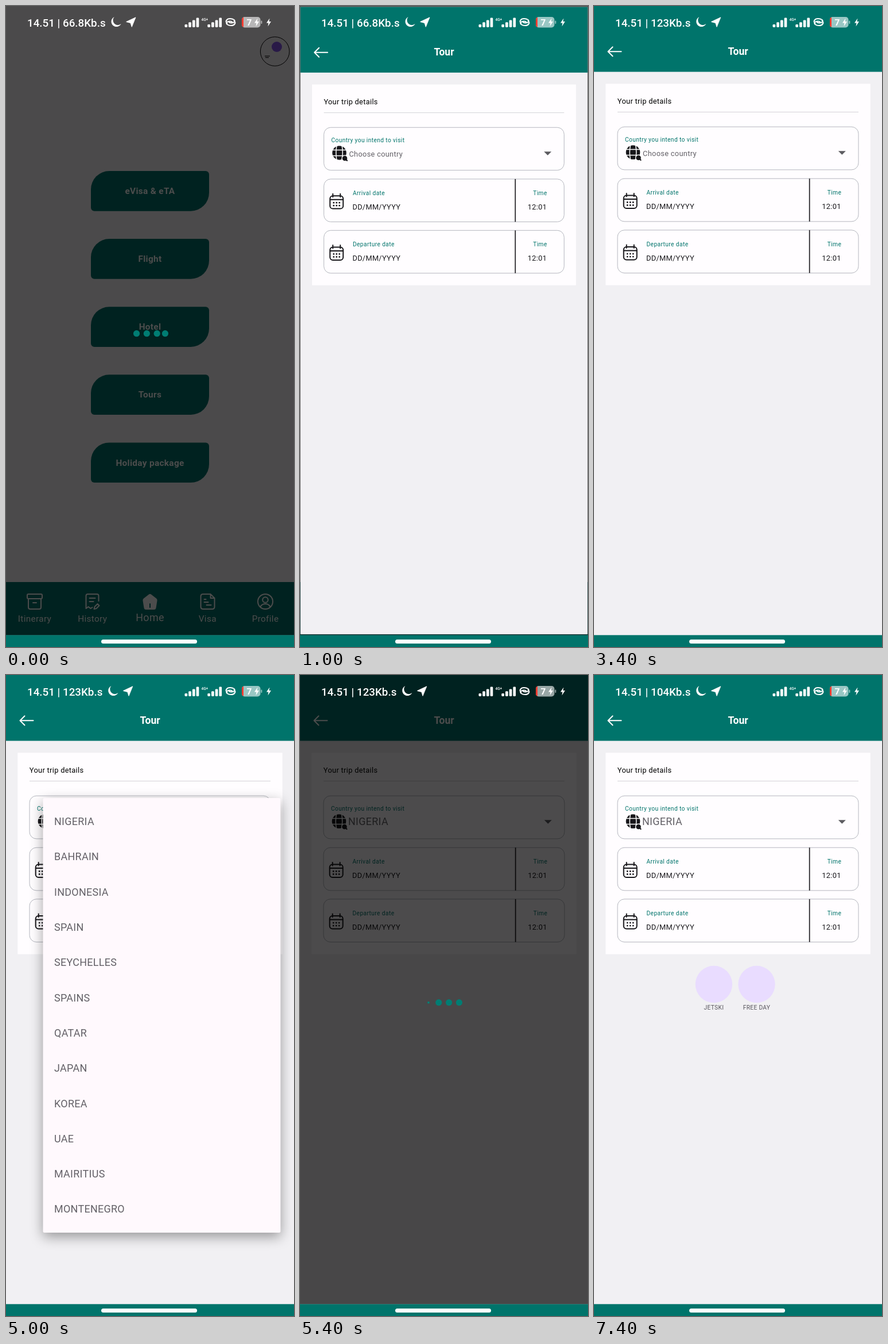
Write an HTML page with a canvas that moves like this. It is 502 px wide and 1115 px high and loops after 8 s.

```html
<!DOCTYPE html>
<html lang="en">
<head>
<meta charset="utf-8">
<title>Tour booking</title>
<style>
html, body { margin: 0; width: 100%; height: 100%; overflow: hidden; background: #00746b; }
canvas { display: block; width: 502px; height: 1115px; }
</style>
</head>
<body>
<canvas></canvas>
<script>
const W = 502, H = 1115, PAGE_H = 1094.5;
const LOOP = 8000, STEP = 200;
const GREEN = '#00746b', INK = '#17161a', GRAY = '#626066', WHITE = '#fff';
const COUNTRIES = ['NIGERIA', 'BAHRAIN', 'INDONESIA', 'SPAIN', 'SEYCHELLES', 'SPAINS',
  'QATAR', 'JAPAN', 'KOREA', 'UAE', 'MAIRITIUS', 'MONTENEGRO'];

const canvas = document.querySelector('canvas');
const ctx = canvas.getContext('2d');
const ratio = window.devicePixelRatio || 1;
canvas.width = W * ratio;
canvas.height = H * ratio;

const clamp = v => Math.min(1, Math.max(0, v));

// y is the middle of the capital letters
function text(str, x, y, size, color, { weight = 400, align = 'left', gap = 0.32 } = {}) {
  ctx.font = `${weight} ${size}px Roboto, sans-serif`;
  ctx.letterSpacing = gap + 'px';
  ctx.textAlign = align;
  ctx.fillStyle = color;
  ctx.fillText(str, x, y + size * 0.3555);
  return ctx.measureText(str).width;
}

function rect(x, y, w, h, color) {
  ctx.fillStyle = color;
  ctx.fillRect(x, y, w, h);
}

function round(x, y, w, h, r, fill, stroke, line = 1) {
  ctx.beginPath();
  ctx.roundRect(x, y, w, h, r);
  paint(fill, stroke, line);
}

function circle(x, y, r, fill, stroke, line = 1) {
  ctx.beginPath();
  ctx.arc(x, y, r, 0, Math.PI * 2);
  paint(fill, stroke, line);
}

function paint(fill, stroke, line) {
  if (fill) { ctx.fillStyle = fill; ctx.fill(); }
  if (stroke) { ctx.strokeStyle = stroke; ctx.lineWidth = line; ctx.stroke(); }
}

// SVG path placed around its own centre
function icon(x, y, d, fill, stroke, line = 2) {
  const path = new Path2D(d);
  ctx.save();
  ctx.translate(x, y);
  ctx.lineCap = ctx.lineJoin = 'round';
  if (fill) { ctx.fillStyle = fill; ctx.fill(path); }
  if (stroke) { ctx.strokeStyle = stroke; ctx.lineWidth = line; ctx.stroke(path); }
  ctx.restore();
}

const BOLT = 'M1.5-7L-4 1H-.5L-1.5 7L4-1.5H.5Z';

function statusBar(speed) {
  const end = 37 + text(`14.51 | ${speed}Kb.s`, 37, 29, 18.8, WHITE, { weight: 500, gap: 0 });
  icon(end + 18, 28, 'M-3-9A9 9 0 1 0 9 3A8.5 8.5 0 0 1-3-9Z', WHITE);
  icon(end + 44, 28, 'M8-8L-8-.5L-.5 1.5L1.5 8Z', WHITE, WHITE, 1);
  for (const left of [311.5, 351.3]) {
    for (let i = 0; i < 4; i++) {
      const h = 5 + i * 3.8;
      round(left + i * 6.7, 37 - h, 4.7, h, 1.4, WHITE);
    }
  }
  text('4G+', 340.5, 24, 6.5, WHITE, { weight: 500, gap: 0 });
  icon(391.5, 28, 'M-6 2C-10-1-7-6-1-6C5-6 8-3 7-1C6 2-1 2-3 0M6-2C10 1 7 6 1 6C-5 6-8 3-7 1C-6-2 1-2 3 0', null, WHITE, 2);
  ctx.save();
  ctx.beginPath();
  ctx.roundRect(411, 19, 32.5, 18.5, 5);
  ctx.clip();
  rect(411, 19, 33, 19, 'rgba(255,255,255,.6)');
  rect(411, 19, 3, 19, '#ff3b30');
  ctx.restore();
  round(444.5, 25.5, 1.8, 5.5, 1, 'rgba(255,255,255,.6)');
  text('7', 424, 28.5, 15.5, WHITE, { weight: 700, align: 'center', gap: 0 });
  icon(437, 28.5, BOLT, WHITE);
  icon(458, 28.5, BOLT, WHITE);
}

function systemStrip() {
  rect(0, PAGE_H, W, H - PAGE_H, GREEN);
  round(166, 1102, 167, 7, 3.5, WHITE);
}

function navBar() {
  rect(0, 1002, W, PAGE_H - 1002, GREEN);
  const label = (str, x) => text(str, x, 1065.5, 15.36, WHITE, { align: 'center' });
  const y = 1036;
  icon(50, y, 'M-11-13H11Q13-13 13-11V-7Q13-5 11-5H-11Q-13-5-13-7V-11Q-13-13-11-13ZM-11-5V10Q-11 13-8 13H8Q11 13 11 10V-5M-3 2H3', null, WHITE);
  icon(150.5, y, 'M11-1V-10Q11-13 8-13H-8Q-11-13-11-10V12L-7 9L-3 12L0 10M-5-6H5M-5 0H2M3 13L4 9L9 4L12 7L7 12Z', null, WHITE);
  icon(251, y, 'M-2-12.5Q0-14 2-12.5L11-5.5Q13-4 12.5-1.5L10.5 11Q10 14 7 14H-7Q-10 14-10.5 11L-12.5-1.5Q-13-4-11-5.5Z', WHITE);
  icon(251, y + 6, 'M0-2V4', null, GREEN);
  icon(351.5, y, 'M-8-13H5L12-6V9Q12 13 8 13H-8Q-12 13-12 9V-9Q-12-13-8-13ZM-6-4H-3M-6 1H1M-2 6H6M5-12V-6H11', null, WHITE);
  circle(452, y, 13, null, WHITE, 2);
  circle(452, y - 3, 4.8, null, WHITE, 2);
  icon(452, y, 'M-8.5 9Q-6 4 0 4T8.5 9', null, WHITE);
  label('Itinerary', 50);
  label('History', 150.7);
  label('Visa', 351.3);
  label('Profile', 452);
  text('Home', 251, 1063.5, 17.9, WHITE, { align: 'center' });
}

function homePage() {
  rect(0, 0, W, PAGE_H, '#fdf8fd');
  circle(468.7, 79, 25.3, null, '#000');
  circle(472, 71, 9, '#8a58f0');
  rect(451, 86.5, 9, 1.2, '#222');
  rect(452, 89, 6, 1.2, '#222');
  ['eVisa & eTA', 'Flight', 'Hotel', 'Tours', 'Holiday package'].forEach((name, i) => {
    const y = 287 + i * 118.1;
    round(148, y, 206, 69.7, [32, 6, 32, 6], GREEN);
    text(name, 251, y + 34.7, 15.36, WHITE, { weight: 700, align: 'center' });
  });
  navBar();
}

function globe(x, y) {
  circle(x, y, 12.3, INK);
  icon(x, y, 'M-13-5H13M-13 5H13M0-13V-13M-4.5-13Q-7 0-4.5 13M4.5-13Q7 0 4.5 13', null, WHITE, 1.5);
  circle(x + 9.5, y + 9.5, 5.6, WHITE);
  circle(x + 9.5, y + 9.5, 4.3, INK);
  icon(x + 12, y + 12, 'M0 0L1.5 1.5', null, INK, 2.2);
}

function calendar(x, y) {
  round(x - 11.5, y - 9.5, 23, 22.5, 5, null, INK, 2);
  icon(x, y, 'M-6.5-13V-7.5M6.5-13V-7.5M-11-3H11', null, INK, 2);
  for (let i = 0; i < 6; i++) {
    circle(x + (i % 3 - 1) * 5, y + 2.5 + Math.floor(i / 3) * 5, 1.4, INK);
  }
}

function fieldBox(y) {
  round(41, y, 420, 74.7, 12, null, '#b4b6be');
}

function label(str, x, y, align) {
  text(str, x, y, 10.24, GREEN, { gap: 0.38, align });
}

function dateField(y, name) {
  fieldBox(y);
  rect(374.8, y, 1.7, 74.7, '#1d1c20');
  calendar(63.2, y + 38.8);
  label(name, 91.5, y + 24.3);
  text('DD/MM/YYYY', 91, y + 48.5, 12.8, INK);
  label('Time', 419, y + 24.3, 'center');
  text('12:01', 414, y + 48.5, 12.8, INK, { align: 'center' });
}

function tourPage({ country, activities }) {
  rect(0, 0, W, PAGE_H, '#f1f0f3');
  rect(0, 0, W, 114.5, GREEN);
  icon(36, 79.3, 'M11.5 0H-11M-3.5-8L-11.5 0L-3.5 8', null, WHITE, 2);
  text('Tour', 251, 78.5, 17.5, WHITE, { weight: 700, align: 'center', gap: 0 });

  rect(20.3, 135.3, 461.5, 350.3, '#fffdff');
  text('Your trip details', 40.8, 165, 12.8, '#000');
  rect(41, 184, 420, 1, '#d4d3d8');

  fieldBox(210.2);
  label('Country you intend to visit', 54, 232.3);
  globe(68, 254.5);
  if (country) text(country, 84, 255, 17.9, GRAY);
  else text('Choose country', 85, 256.7, 12.8, GRAY);
  icon(432.3, 255.5, 'M-6.5-3.2H6.5L0 3.3Z', '#5c5b60');
  dateField(300.2, 'Arrival date');
  dateField(389.8, 'Departure date');

  if (activities) {
    ['JETSKI', 'FREE DAY'].forEach((name, i) => {
      const x = 208.9 + i * 74.6;
      circle(x, 538, 32.2, '#e9dcff');
      text(name, x, 578, 10.24, '#57545c', { align: 'center' });
    });
  }
}

function countryMenu() {
  ctx.save();
  ctx.shadowColor = 'rgba(0,0,0,.38)';
  ctx.shadowBlur = 22 * ratio;
  ctx.shadowOffsetY = 7 * ratio;
  round(64.5, 214, 414, 756, 2.5, '#fff9fd');
  ctx.restore();
  COUNTRIES.forEach((name, i) => text(name, 84, 254.5 + i * 61.33, 17.9, GRAY));
}

// The first dot grows in, then three dots slide one place to the right.
function loader(turns) {
  const phase = turns % 1;
  const gap = 17.8, color = '#007d73';
  const shift = clamp((phase - 0.22) / 0.6) * gap;
  circle(224 + shift, 569.7, 5.6 * clamp(phase / 0.22), color);
  for (let i = 1; i < 3; i++) circle(224 + i * gap + shift, 569.7, 5.6, color);
  circle(224 + 3 * gap, 569.7, 5.6, color);
}

function dim(alpha) {
  if (alpha) rect(0, 0, W, PAGE_H, `rgba(0,0,0,${alpha})`);
}

function tourDim(t) {
  if (t < 5200 || t >= 6800) return 0;
  if (t < 5400) return 0.1;
  return t < 6600 ? 0.7 : 0.64;
}

function draw(t) {
  ctx.setTransform(ratio, 0, 0, ratio, 0, 0);
  if (t < 1200) {
    homePage();
    dim(0.7);
  }
  if (t < 1000) loader(t / 1000 + 0.34);
  else {
    ctx.save();
    if (t < 1200) {
      ctx.translate(251, 557);
      ctx.scale(0.997, 0.997);
      ctx.translate(-251, -557);
    }
    tourPage({ country: t >= 5200 && COUNTRIES[0], activities: t >= 6600 });
    ctx.restore();
    if (t >= 3800 && t < 5200) countryMenu();
    dim(tourDim(t));
    if (t >= 5400 && t < 6800) loader((t - 5400) / 1000 + 0.08);
  }
  systemStrip();
  statusBar(t < 3400 ? '66.8' : t < 7400 ? '123' : '104');
}

function tick() {
  const t = performance.now() % LOOP;
  draw(Math.floor(t / STEP) * STEP);
  requestAnimationFrame(tick);
}
tick();
</script>
</body>
</html>
```
